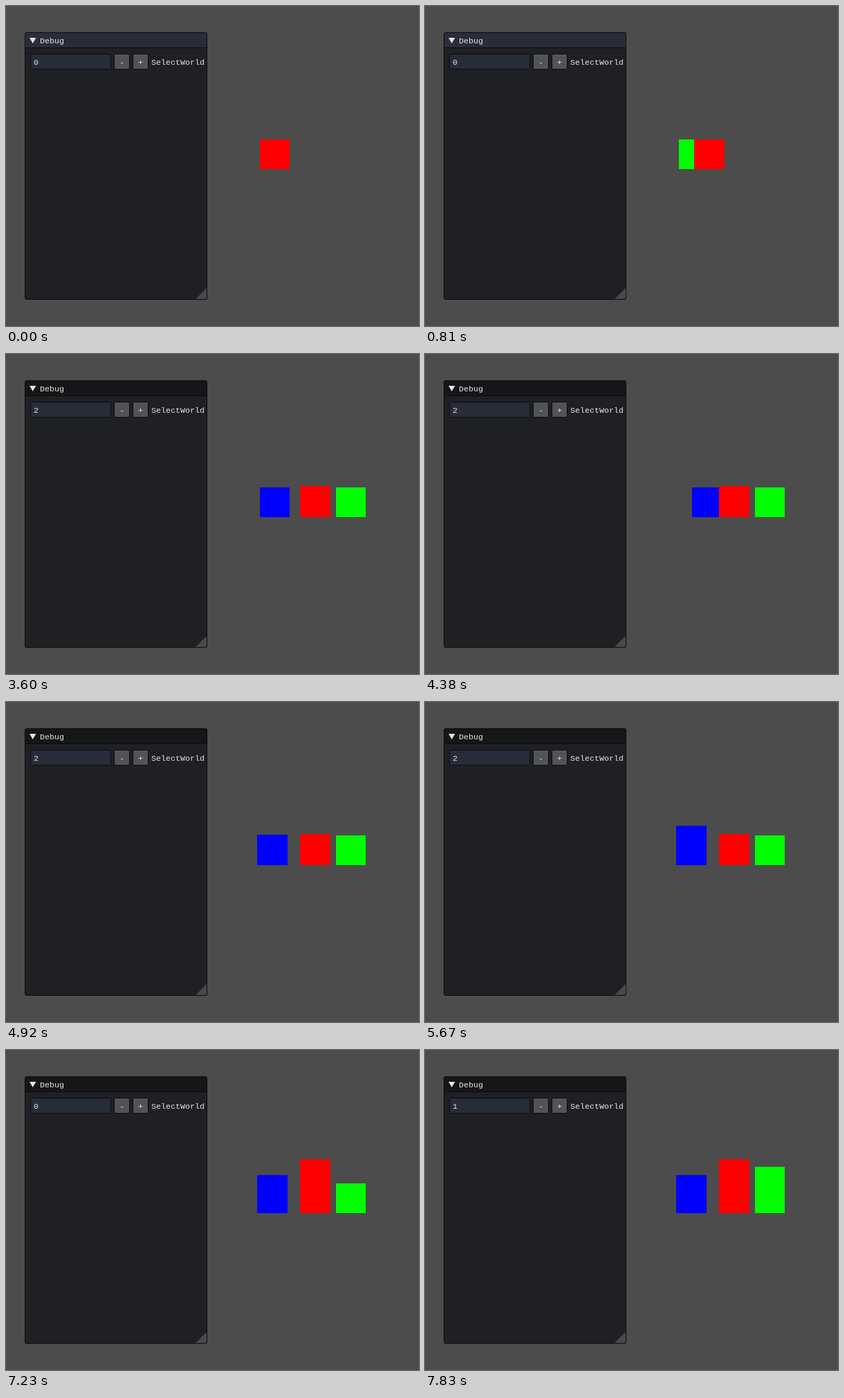
Write an HTML page that moves like this. It is 597 px wide and 463 px high and loops after 9390 ms.

```html
<!DOCTYPE html>
<html lang="en">
<head>
<meta charset="utf-8">
<title>Debug panel with three boxes</title>
<style>
  html, body { margin: 0; width: 100%; height: 100%; overflow: hidden; background: #4c4c4c; }
  svg { display: block; }
  text { font: 11.67px "Liberation Mono", "DejaVu Sans Mono", monospace; fill: #e4e4e4; white-space: pre; }
  .frame { stroke: #0b0b0c; stroke-width: 1; }
  .button { fill: #525356; }
  #title { animation: blur 9390ms step-end infinite; }
  @keyframes blur {
    0% { fill: #292d3b; }
    38.339% { fill: #151617; }
  }
</style>
</head>
<body>
<svg width="597" height="463" viewBox="0 0 597 463">
  <rect class="frame" x="27.5" y="38.5" width="263" height="386" rx="2" fill="#1f2024"/>
  <path id="title" d="M28 60V40l1-1H289l1 1V60Z"/>
  <path class="frame" d="M28 60.5H290"/>
  <path d="M34 46H43.4L38.7 54Z" fill="#e4e4e4"/>
  <text x="49" y="54">Debug</text>

  <rect class="frame" x="35.5" y="69.5" width="116" height="22" rx="2" fill="#272c39"/>
  <rect class="frame button" x="156.5" y="69.5" width="22" height="22" rx="2"/>
  <rect class="frame button" x="183.5" y="69.5" width="22" height="22" rx="2"/>
  <text id="value" x="40" y="85">0</text>
  <text x="164" y="85">-</text>
  <text x="191" y="85">+</text>
  <text x="210" y="85">SelectWorld</text>
  <path d="M290 408V422l-2 2H274Z" fill="#48494b"/>

  <g shape-rendering="crispEdges">
    <rect id="blue" fill="#00f"/>
    <rect id="green" fill="#0f0"/>
    <rect id="red" fill="#f00"/>
  </g>
</svg>
<script>
  const LOOP = 9390, TICK = 30;
  const HOME = 366.6, TOP = 192.9, FLOOR = 236, WIDTH = 43.5;
  const $ = id => document.getElementById(id);

  // World selected in the panel: [time, value]
  const picks = [[0, 0], [1410, 1], [1500, 2], [6300, 1], [6510, 0], [7290, 1]];

  // Distance covered by a key held for a number of ticks
  const held = (t, start, ticks, speed) =>
    speed * Math.max(0, Math.min(ticks, Math.floor((t - start) / TICK) + 1));

  function place(id, x, top) {
    const left = Math.round(x), y = Math.round(top), box = $(id);
    box.setAttribute("x", left);
    box.setAttribute("y", y);
    box.setAttribute("width", Math.round(x + WIDTH) - left);
    box.setAttribute("height", FLOOR - y);
  }

  function draw(t) {
    $("value").textContent = picks.filter(p => p[0] <= t).pop()[1];

    place("red",
      HOME + held(t, 600, 21, 2.8),
      TOP - held(t, 1230, 1, 1.5) - held(t, 6510, 24, 1.39));

    place("green",
      t < 1500 ? HOME : 476.7,
      TOP - held(t, 7350, 17, 1.4));

    place("blue",
      HOME + held(t, 4200, 8, 2.8) - held(t, 4440, 10, 2.58),
      TOP - held(t, 4920, 18, 1.37) + held(t, 5460, 13, 1.3) - held(t, 5970, 3, 1.35));
  }

  const begin = performance.now();
  function tick() {
    draw((performance.now() - begin) % LOOP);
    requestAnimationFrame(tick);
  }
  tick();
</script>
</body>
</html>
```
